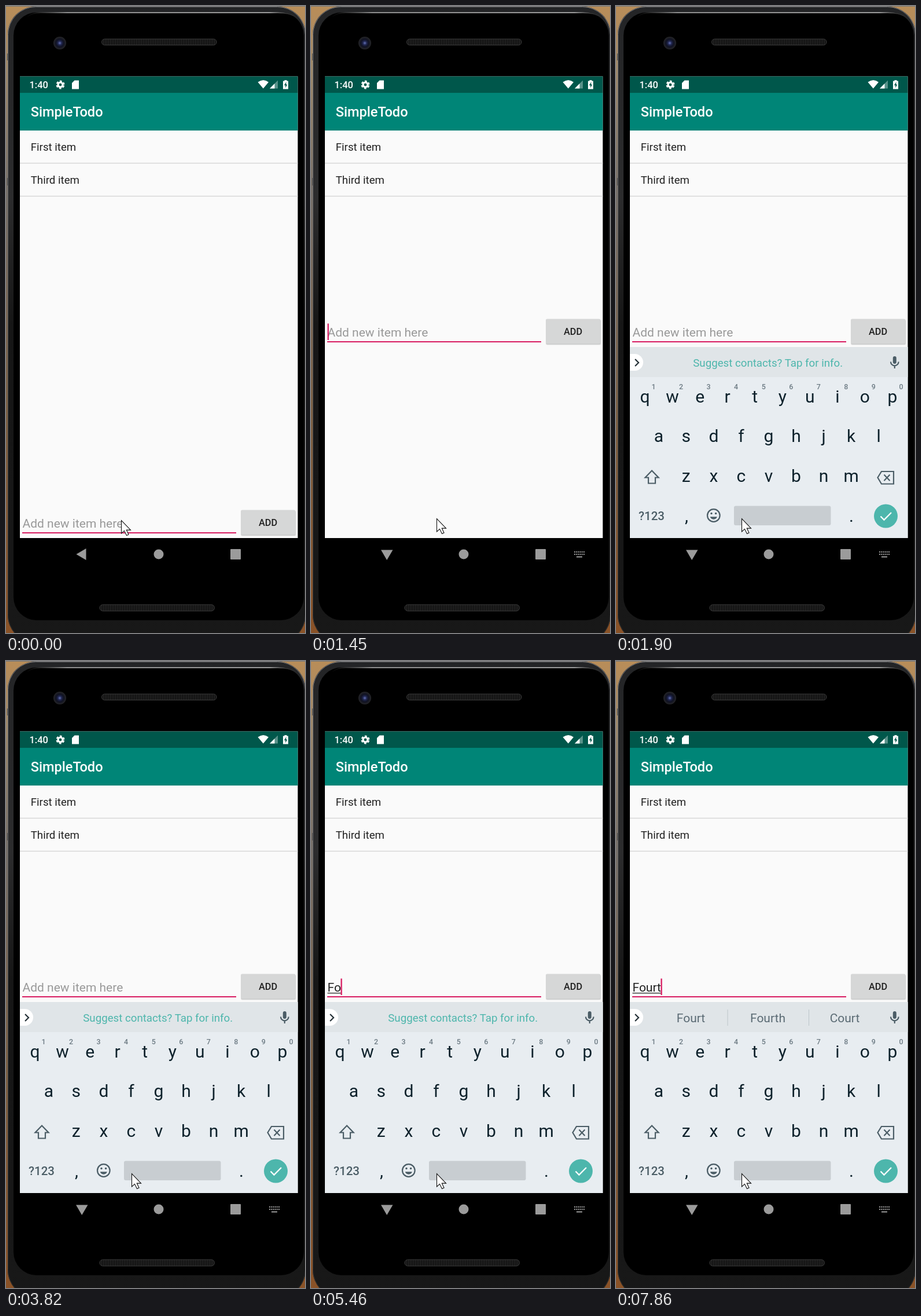
Recreate the animation shown at these times as an HTML page. Size 517 by 1083 pixels, loop 8000 ms.

```html
<!DOCTYPE html>
<html lang="en">
<head>
<meta charset="utf-8">
<title>Todo list</title>
<style>
  html, body { margin: 0; width: 100%; height: 100%; overflow: hidden; background: #000; }
  svg { display: block; width: 517px; height: 1083px; font-family: Roboto, sans-serif; }
  text { white-space: pre; }
  .mid { text-anchor: middle; }
  .bold { font-weight: 500; }
  .line { fill: none; stroke: #4b5d66; stroke-width: 2.2; }
</style>
</head>
<body>
<svg viewBox="0 0 517 1083">
  <defs>
    <linearGradient id="wood" x2="0" y2="1">
      <stop offset="0" stop-color="#b98d58"/>
      <stop offset=".1" stop-color="#a08a6c"/>
      <stop offset=".3" stop-color="#77706a"/>
      <stop offset=".65" stop-color="#7c6044"/>
      <stop offset="1" stop-color="#8a5227"/>
    </linearGradient>
    <linearGradient id="rim" x2="0" y2="1">
      <stop offset="0" stop-color="#232426"/>
      <stop offset=".3" stop-color="#2c2c2d"/>
      <stop offset=".5" stop-color="#161616"/>
      <stop offset="1" stop-color="#181818"/>
    </linearGradient>
    <linearGradient id="edge" x2="0" y2="1">
      <stop offset="0" stop-color="#77787b"/>
      <stop offset=".4" stop-color="#5c5d5f"/>
      <stop offset="1" stop-color="#2e2e2e"/>
    </linearGradient>
    <linearGradient id="shine">
      <stop offset="0" stop-color="#777" stop-opacity="0"/>
      <stop offset=".15" stop-color="#bbb"/>
      <stop offset=".9" stop-color="#ccc"/>
      <stop offset="1" stop-color="#777" stop-opacity="0"/>
    </linearGradient>
    <radialGradient id="lens">
      <stop offset="0" stop-color="#6673b8"/>
      <stop offset=".3" stop-color="#20264f"/>
      <stop offset=".6" stop-color="#101222"/>
      <stop offset="1" stop-color="#262628"/>
    </radialGradient>
    <pattern id="mesh" width="3" height="3" patternUnits="userSpaceOnUse">
      <rect width="3" height="3" fill="#121212"/>
      <path d="M.5 0V3" stroke="#2a2a2a"/>
    </pattern>
    <clipPath id="screen"><rect x="24" y="121.500" width="480.500" height="797.500"/></clipPath>
  </defs>

  <!-- phone -->
  <rect width="517" height="1083" fill="url(#wood)"/>
  <rect x="2" y="82" width="8" height="12" fill="#444"/>
  <rect x="2" y="297" width="8" height="13" fill="#444"/>
  <rect x="3" y="1" width="515" height="1099" rx="48" fill="url(#rim)"/>
  <rect x="3.5" y="1.5" width="514" height="1098" rx="48" fill="none" stroke="url(#edge)"/>
  <rect x="13" y="11" width="502" height="1050" rx="40"/>
  <path d="M36 19Q45 11.5 60 11.5H470Q490 11.5 502 20" fill="none" stroke="url(#shine)" stroke-width="1.6"/>
  <path d="M0 .5H517" stroke="#777"/>
  <g fill="url(#mesh)" stroke="#3a3a3a">
    <rect x="165.500" y="57" width="198.500" height="10.500" rx="5.200"/>
    <rect x="162" y="1034" width="198.500" height="11" rx="5.500"/>
  </g>
  <circle cx="93" cy="64" r="11" fill="url(#lens)"/>

  <!-- app -->
  <g clip-path="url(#screen)">
    <rect x="24" y="121" width="481" height="798" fill="#fafafa"/>
    <rect x="24" y="121" width="481" height="29" fill="#00574b"/>
    <rect x="24" y="150" width="481" height="65" fill="#008577"/>
    <rect x="24" y="215" width="481" height="1" opacity=".06"/>
    <g fill="#fff">
      <text class="bold" x="40.500" y="142" font-size="16.400">1:40</text>
      <text class="bold" x="42.700" y="191" font-size="23.600">SimpleTodo</text>
      <circle cx="94" cy="136" r="4" fill="none" stroke="#fff" stroke-width="3.200"/>
      <circle cx="94" cy="136" r="6.400" fill="none" stroke="#fff" stroke-width="2.200" stroke-dasharray="3.800 2.902" stroke-dashoffset="-1.450"/>
      <path d="M118.500 128.500H126V143.500H114V133Z"/>
      <path d="M435.500 131.500Q445 124.500 454 131.500L444.800 142.500Z"/>
      <path d="M470 128.500V142.500H456Z" opacity=".35"/>
      <path d="M464.500 134V142.500H456Z"/>
      <path d="M479 129.500H481.500V128H485.500V129.500H488V143.500H479Z"/>
    </g>
    <path d="M484.500 131L481 137H483.200V141.500L486.300 135.500H484.200Z" fill="#00574b"/>
    <g font-size="18.700" fill="#212121">
      <text x="42.700" y="250">First item</text>
      <text x="42.700" y="307">Third item</text>
    </g>
    <path d="M24 271.500H505M24 328.500H505" stroke="#d6d6d6" stroke-width="1.300"/>

    <g id="row">
      <text id="hint" x="28.500" y="571" font-size="21" fill="#999">Add new item here</text>
      <text id="typed" x="28.500" y="571" font-size="21" fill="#222"></text>
      <path id="under" stroke="#222" stroke-width="1.300"/>
      <path d="M28 580H398" stroke="#d81b60" stroke-width="2"/>
      <rect id="caret" y="548.500" width="2.300" height="28.500" fill="#d81b60"/>
      <rect x="406" y="542" width="95.500" height="43.500" rx="2.500" opacity=".1"/>
      <rect x="406.500" y="541.500" width="94" height="43" rx="2.500" opacity=".13"/>
      <rect x="406" y="540.500" width="94.500" height="43" rx="2.300" fill="#d6d7d7"/>
      <text class="mid bold" x="453" y="568" font-size="16.350" fill="#212121">ADD</text>
    </g>

    <!-- keyboard -->
    <g id="keyboard">
      <rect x="24" y="589" width="481" height="400" fill="#e8edf1"/>
      <rect x="24" y="589" width="481" height="52" fill="#e0e5e8"/>
      <path d="M24 601H32.500A14.500 14.500 0 0 1 32.500 630H24Z" fill="#fff"/>
      <path d="M33 610L39 616L33 622" class="line" style="stroke:#263238"/>
      <text id="notice" class="mid" x="262.700" y="623" font-size="18.700" fill="#4db6ac">Suggest contacts? Tap for info.</text>
      <g id="words" class="mid" font-size="21" fill="#5b6b74">
        <path d="M193 602V630M333.500 602V630" stroke="#bdc6ca"/>
      </g>
      <rect x="478.800" y="605" width="6" height="13" rx="3" fill="#4b5d66"/>
      <path d="M475 614.500A6.800 6.800 0 0 0 488.600 614.500M481.800 621.500V626" class="line"/>
      <g id="keys" class="mid" font-size="30" fill="#0d212b"></g>
      <g id="digits" class="mid bold" font-size="12.500" fill="#6d7b84"></g>
      <path id="shift" d="M62 802.500L73.500 814.500H68V824.500H56V814.500H50.500Z" class="line"/>
      <path d="M452.500 814.500L459 804H480V825.500H459ZM463.500 809.500L473.500 820M473.500 809.500L463.500 820" class="line"/>
      <text class="mid bold" x="61.500" y="888" font-size="20.500" fill="#4b5d66">?123</text>
      <g class="mid" font-size="30" fill="#0d212b">
        <text x="122" y="891">,</text>
        <text x="407" y="891">.</text>
      </g>
      <circle cx="168.800" cy="880" r="10.800" class="line"/>
      <g fill="#4b5d66">
        <path d="M162.800 882.300H174.800A6.300 6.300 0 0 1 162.800 882.300Z"/>
        <circle cx="165" cy="876.500" r="1.700"/>
        <circle cx="172.600" cy="876.500" r="1.700"/>
      </g>
      <rect x="204" y="863.500" width="167.500" height="33.500" rx="3" fill="#c8cdd1"/>
      <circle cx="466.500" cy="881" r="20.500" fill="#4db6ac"/>
      <path d="M457.500 881.500L463.500 887.500L476 875" fill="none" stroke="#fff" stroke-width="2.300"/>
    </g>
  </g>

  <!-- navigation bar -->
  <g fill="#9b9b9b">
    <path id="back"/>
    <circle cx="264" cy="947" r="8.500"/>
    <rect x="388" y="938" width="18" height="18" rx="1"/>
    <g id="toggle" fill="none" stroke="#9b9b9b" stroke-width="2">
      <path d="M455 943H473M455 947H473" stroke-dasharray="2 1.200"/>
      <path d="M459 951.500H469"/>
    </g>
  </g>

  <path id="mouse" d="M0 0V22.500L5 17.800L9 26L12.500 24.400L8.800 16.600H16Z" fill="#fff" stroke="#111" stroke-width="1.100"/>
</svg>

<script>
const $ = id => document.getElementById(id);
const LOOP = 8000;

function addText(parent, x, y, label) {
  const node = document.createElementNS('http://www.w3.org/2000/svg', 'text');
  node.setAttribute('x', x);
  node.setAttribute('y', y);
  node.textContent = label;
  return parent.appendChild(node);
}

const PITCH = 47.55;
const keys = [['qwertyuiop', 50, 684.5], ['asdfghjkl', 73.8, 753], ['zxcvbnm', 121.3, 821.5]]
  .flatMap(([letters, x, y]) => [...letters].map((c, i) => addText($('keys'), x + i * PITCH, y, c)));
[...'1234567890'].forEach((d, i) => addText($('digits'), 65 + i * PITCH, 662, d));
const words = [129.5, 262.5, 395.5].map(x => addText($('words'), x, 623.5, ''));

const CARET_X = { '': 28.5, F: 39.4, Fo: 51.4, For: 58.4, Fou: 63.4, Four: 70.4, Fourt: 77.4 };
const BACK = { left: 'M121.500 947L138.500 937V957Z', down: 'M121 939.500H141.500L131.200 957Z' };

// Each step changes only the listed parts of the state.
const steps = [
  [0, { caret: 0, ime: 0, raised: 0, board: 0, slide: 0, caps: 0, text: '', words: '', mouse: [199.5, 888.5] }],
  [530, { caret: 1 }],
  [840, { ime: 1 }],
  [1170, { mouse: [203.5, 887.5] }],
  [1260, { mouse: [209.5, 886.5], raised: 1 }],
  [1350, { mouse: [214.5, 885.5] }],
  [1450, { mouse: [217.5, 885.5] }],
  [1810, { caret: 0, board: .85, slide: 28 }],
  [1900, { board: 1, slide: 0 }],
  [2180, { caret: 1 }],
  [2860, { caret: 0 }],
  [3200, { caret: 1 }],
  [3820, { caret: 0 }],
  [4200, { caret: 1 }],
  [4380, { caps: 1 }],
  [4660, { caps: 0 }],
  [4810, { text: 'F' }],
  [5180, { caret: 0 }],
  [5460, { text: 'Fo', caret: 1 }],
  [5640, { text: 'For', words: 'For Fort Forms' }],
  [6110, { text: 'Fo' }],
  [6290, { words: 'Fo Do For' }],
  [6820, { text: 'Fou' }],
  [6990, { words: 'Fou You Four' }],
  [7240, { text: 'Four' }],
  [7520, { words: 'Four Fourth Your' }],
  [7700, { text: 'Fourt' }],
  [7860, { words: 'Fourt Fourth Court' }]
];

const show = (id, opacity) => $(id).setAttribute('opacity', Number(opacity));
const move = (id, x, y) => $(id).setAttribute('transform', `translate(${x} ${y})`);

function draw(s) {
  const x = CARET_X[s.text];
  move('row', 0, s.raised ? 0 : 330);
  show('hint', !s.text);
  $('typed').textContent = s.text;
  $('under').setAttribute('d', s.text ? `M28.500 573.700H${x + .5}` : '');
  $('caret').setAttribute('x', x);
  show('caret', s.caret);

  show('keyboard', s.board);
  move('keyboard', 0, s.slide);
  show('notice', !s.words);
  show('words', !!s.words);
  const list = s.words.split(' ');
  words.forEach((node, i) => node.textContent = list[i] || '');
  keys.forEach(k => k.textContent = s.caps ? k.textContent.toUpperCase() : k.textContent.toLowerCase());
  $('shift').style.fill = s.caps ? '#4b5d66' : 'none';

  $('back').setAttribute('d', s.ime ? BACK.down : BACK.left);
  show('toggle', s.ime);
  move('mouse', ...s.mouse);
}

const start = performance.now();
let last = -1;
function tick() {
  const t = (performance.now() - start) % LOOP;
  const passed = steps.filter(([at]) => at <= t);
  if (passed.length !== last) {
    last = passed.length;
    draw(Object.assign({}, ...passed.map(([, change]) => change)));
  }
  requestAnimationFrame(tick);
}
tick();
</script>
</body>
</html>
```
